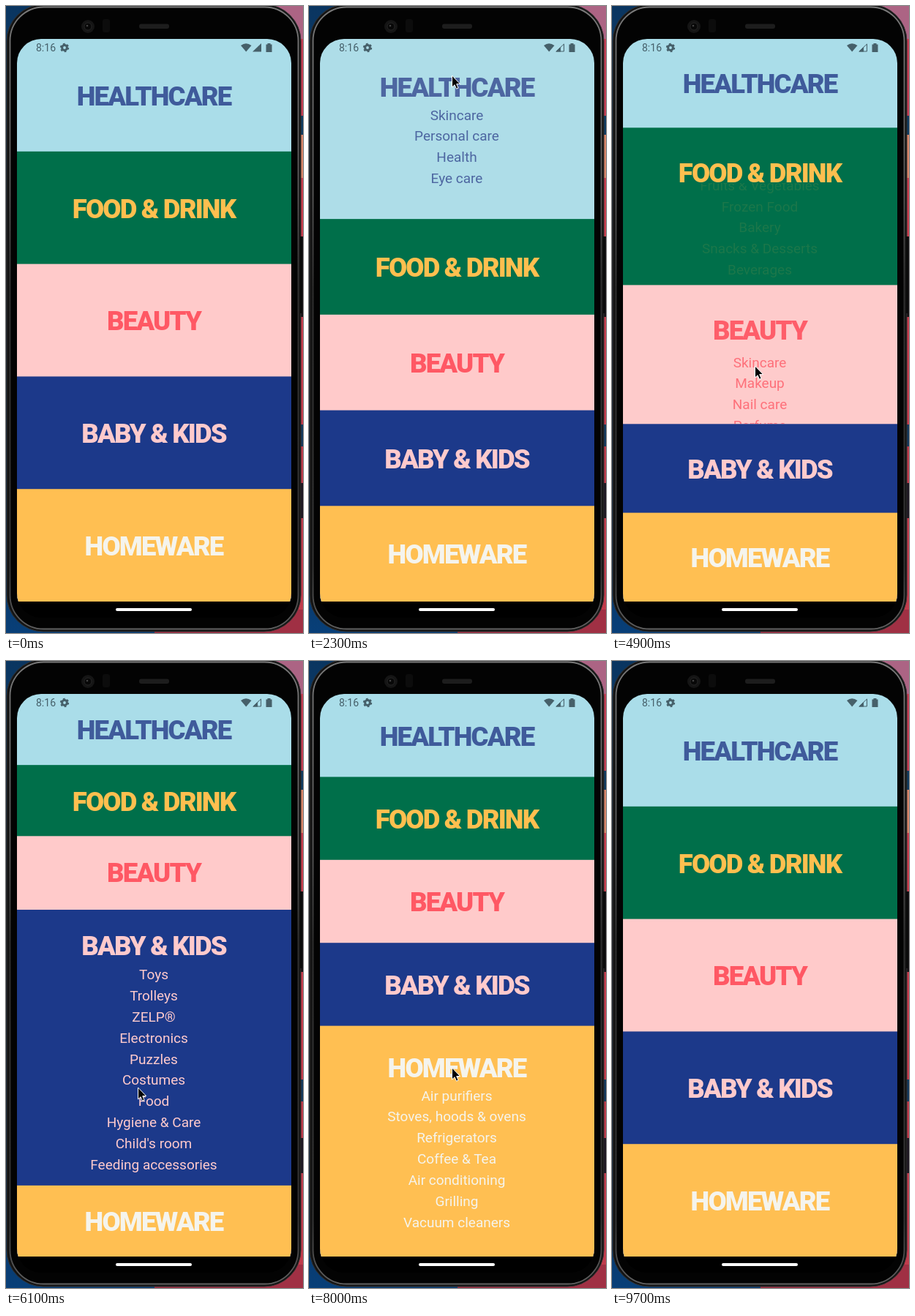
Animation of 406x857 px, one loop 9800 ms. Source, as an HTML page:

```html
<!DOCTYPE html>
<html lang="en">
<head>
<meta charset="utf-8">
<title>Category accordion</title>
<style>
  html, body { margin: 0; width: 100%; height: 100%; overflow: hidden; background: #000; }
  #stage { display: block; width: 406px; height: 857px; font-family: Roboto, Inter, sans-serif; text-anchor: middle; }
  .title { font-size: 36.5px; font-weight: 900; letter-spacing: -1.82px; }
  .item { font-size: 19px; }
</style>
</head>
<body>
<svg id="stage" viewBox="0 0 406 857">
  <defs>
    <clipPath id="screen"><rect x="15" y="45" width="375" height="791" rx="33"/></clipPath>
    <linearGradient id="rim" x2="0" y2="1">
      <stop offset="0" stop-color="#7a7a7a"/>
      <stop offset=".3" stop-color="#585858"/>
      <stop offset=".45" stop-color="#303030"/>
      <stop offset=".9" stop-color="#363636"/>
      <stop offset="1" stop-color="#606060"/>
    </linearGradient>
    <linearGradient id="leftWall" x2="0" y2="1">
      <stop offset="0" stop-color="#0a3560"/>
      <stop offset=".1" stop-color="#0b3a68"/>
      <stop offset=".4" stop-color="#10131c"/>
      <stop offset="1" stop-color="#083f78"/>
    </linearGradient>
  </defs>
  <rect width="203" height="857" fill="url(#leftWall)"/>
  <g id="rightWall"></g>
  <rect x="1" y="-2" width="402" height="857" rx="50" fill="#141414" stroke="#303030"/>
  <rect x="5.5" y="1.5" width="394" height="850" rx="46" fill="#030303" stroke="url(#rim)" stroke-width="1.8"/>
  <rect x="402" y="315" width="3" height="105" fill="#0b0b0b"/>
  <circle cx="112" cy="28" r="9" fill="#151515"/>
  <circle cx="112" cy="28" r="5" fill="#080808" stroke="#262626"/>
  <circle cx="111" cy="27" r="1.3" fill="#444"/>
  <rect x="132" y="18" width="10" height="18" rx="3" fill="#0c0c0c"/>
  <rect x="182" y="24.5" width="41" height="6.5" rx="3" fill="#1d1d1d"/>
  <g clip-path="url(#screen)">
    <rect x="15" y="45" width="375" height="791"/>
    <g id="sections"></g>
  </g>
  <g fill="#46606a">
    <text x="41" y="62" font-size="14" text-anchor="start">8:16</text>
    <circle cx="80" cy="57" r="3.4" fill="none" stroke="#46606a" stroke-width="3"/>
    <circle cx="80" cy="57" r="5.2" fill="none" stroke="#46606a" stroke-width="2" stroke-dasharray="2.7 2.75"/>
    <path d="M321 54Q328 48.500 335.500 54L328.200 62.500Z"/>
    <path id="signalFull" d="M349 51V62.500H337Z"/>
    <g id="signalPart">
      <path d="M348.500 52V62H338Z" fill="none" stroke="#46606a"/>
      <path d="M344 56V62.500H337Z"/>
    </g>
    <path d="M357.500 51H361.500V52.500H363.500V63H355.500V52.500H357.500Z"/>
  </g>
  <rect x="150" y="823" width="104" height="4" rx="2" fill="#fff"/>
  <path id="cursor" d="M0 0V16L3.600 12.700L6 18.200L8.600 17.100L6.200 11.600H11.200Z" fill="#000" stroke="#fff" stroke-linejoin="round"/>
</svg>
<script>
const LOOP = 9800, STEP = 100;
const TOP = 45, HEIGHT = 769, ROW = 28.85, MID = 202;

const categories = [
  { title: 'HEALTHCARE', bg: '#aadde9', ink: '#3f5b9b',
    items: ['Skincare', 'Personal care', 'Health', 'Eye care'] },
  { title: 'FOOD & DRINK', bg: '#006f4a', ink: '#ffbf4f',
    items: ['Fruits & Vegetables', 'Frozen Food', 'Bakery', 'Snacks & Desserts', 'Beverages',
      'Alcoholic beverages', 'Dairy & Eggs', 'Breakfast'] },
  { title: 'BEAUTY', bg: '#ffcaca', ink: '#ff5864',
    items: ['Skincare', 'Makeup', 'Nail care', 'Perfume'] },
  { title: 'BABY & KIDS', bg: '#1c398a', ink: '#ffcacc',
    items: ['Toys', 'Trolleys', 'ZELP®', 'Electronics', 'Puzzles', 'Costumes', 'Food',
      'Hygiene & Care', "Child's room", 'Feeding accessories'] },
  { title: 'HOMEWARE', bg: '#ffbf52', ink: '#f5f4ed',
    items: ['Air purifiers', 'Stoves, hoods & ovens', 'Refrigerators', 'Coffee & Tea',
      'Air conditioning', 'Grilling', 'Vacuum cleaners'] }
];

// [time, category that opens, or -1 for none]
const taps = [[0, -1], [1260, 0], [2660, -1], [3362, 1], [4800, 2], [5833, 3], [7060, 4], [8260, -1]];
// [start, end, category]
const ripples = [[1150, 1500, 0], [2250, 2850, 0], [3330, 3750, 1], [4780, 4950, 2],
  [5780, 6050, 3], [6850, 7250, 4], [8150, 8450, 4]];
// [time, x, y]
const pointer = [[250, 199, -21], [600, 195.5, 95], [2850, 195.5, 95], [3250, 196, 278], [4350, 196, 278],
  [4750, 195.5, 492], [5050, 195.5, 492], [5300, 184, 556], [5700, 180.5, 583], [6150, 180.5, 583],
  [6700, 179, 747], [7650, 179, 747], [8000, 195.5, 556], [8500, 195.5, 556], [9100, 207, 144],
  [9150, 207, 144], [9650, 120, -22]];

const $ = id => document.getElementById(id);
const clamp = v => Math.max(0, Math.min(1, v));
const mix = (a, b, p) => a + (b - a) * p;

function add(parent, tag, attrs, text) {
  const el = document.createElementNS('http://www.w3.org/2000/svg', tag);
  set(el, attrs);
  if (text) el.textContent = text;
  return parent.appendChild(el);
}
function set(el, attrs) {
  for (const key in attrs) el.setAttribute(key, attrs[key]);
}

// Slivers of wallpaper beside the phone: [top, colour]
[[0, '#ac6484'], [45, '#c43c52'], [150, '#0d3a60'], [176, '#d88468'], [235, '#c83c4c'], [315, '#141014'],
  [425, '#c43c4c'], [572, '#12385c'], [602, '#bc3a4a'], [652, '#1b1520'], [700, '#c03c4c'], [825, '#a03044']]
  .forEach(([y, fill]) => add($('rightWall'), 'rect', { x: 203, y, width: 203, height: 857 - y, fill }));

const views = categories.map(({ title, bg, ink, items }) => {
  const group = add($('sections'), 'g', { fill: ink });
  const view = {
    back: add(group, 'rect', { x: 15, width: 375, fill: bg }),
    window: add(group, 'svg', { width: 406 })
  };
  view.list = add(view.window, 'g', {});
  items.forEach((name, i) => add(view.list, 'text', { class: 'item', x: MID, y: i * ROW }, name));
  view.title = add(group, 'text', { class: 'title', x: MID }, title);
  view.ripple = add(group, 'rect', { x: 15, width: 375, fill: '#d8d8d8' });
  return view;
});

// Critically damped spring from 0 to 1
function spring(ms) {
  const x = Math.max(0, ms) * 0.02;
  return 1 - (1 + x) * Math.exp(-x);
}

function pointerAt(t) {
  const next = pointer.findIndex(k => k[0] > t);
  if (next < 1) return pointer[next < 0 ? pointer.length - 1 : 0].slice(1);
  const [t0, x0, y0] = pointer[next - 1], [t1, x1, y1] = pointer[next];
  const p = (t - t0) / (t1 - t0), ease = p * p * (3 - 2 * p);
  return [mix(x0, x1, ease), mix(y0, y1, ease)];
}

function draw(t) {
  const last = taps.filter(tap => tap[0] <= t).length - 1;
  const opening = taps[last][1], closing = last ? taps[last - 1][1] : -1;
  const p = spring(t - taps[last][0]);
  const levels = categories.map((c, i) => i === opening ? p : i === closing ? 1 - p : 0);
  const extras = categories.map((c, i) => c.items.length * ROW * levels[i]);
  const base = (HEIGHT - extras.reduce((a, b) => a + b)) / 5;

  let y = TOP;
  views.forEach((view, i) => {
    const height = base + extras[i], centre = y + base / 2, level = levels[i];
    const listTop = centre + 15;
    let alpha = 0, origin = centre;
    if (i === opening) {
      alpha = clamp(0.12 + 1.2 * level);
      origin += (1 - level) * (90 * level - 38);
    } else if (i === closing) {
      // A closing list fades where it stood
      alpha = level ** 2.5;
      origin = TOP + (HEIGHT - categories[i].items.length * ROW) / 5 * (i + 0.5);
    }
    set(view.back, { y, height: TOP + HEIGHT - y });
    set(view.title, { y: centre + 13.8 });
    set(view.window, { y: listTop, height: y + height - listTop });
    set(view.list, { transform: `translate(0 ${origin + 45.2 - listTop})`, opacity: alpha });
    const glow = ripples.filter(r => r[2] === i)
      .reduce((sum, [from, to]) => sum + clamp((t - from) / 75) * clamp((to - t) / 150), 0);
    set(view.ripple, { y, height, opacity: 0.13 * glow });
    y += height;
  });

  set($('signalFull'), { opacity: t < 1300 ? 1 : 0 });
  set($('signalPart'), { opacity: t < 1300 ? 0 : 1 });
  set($('cursor'), { transform: `translate(${pointerAt(t)})` });
}

const start = performance.now();
function tick() {
  const t = (performance.now() - start) % LOOP;
  draw(Math.floor(t / STEP) * STEP);
  requestAnimationFrame(tick);
}
tick();
</script>
</body>
</html>
```
